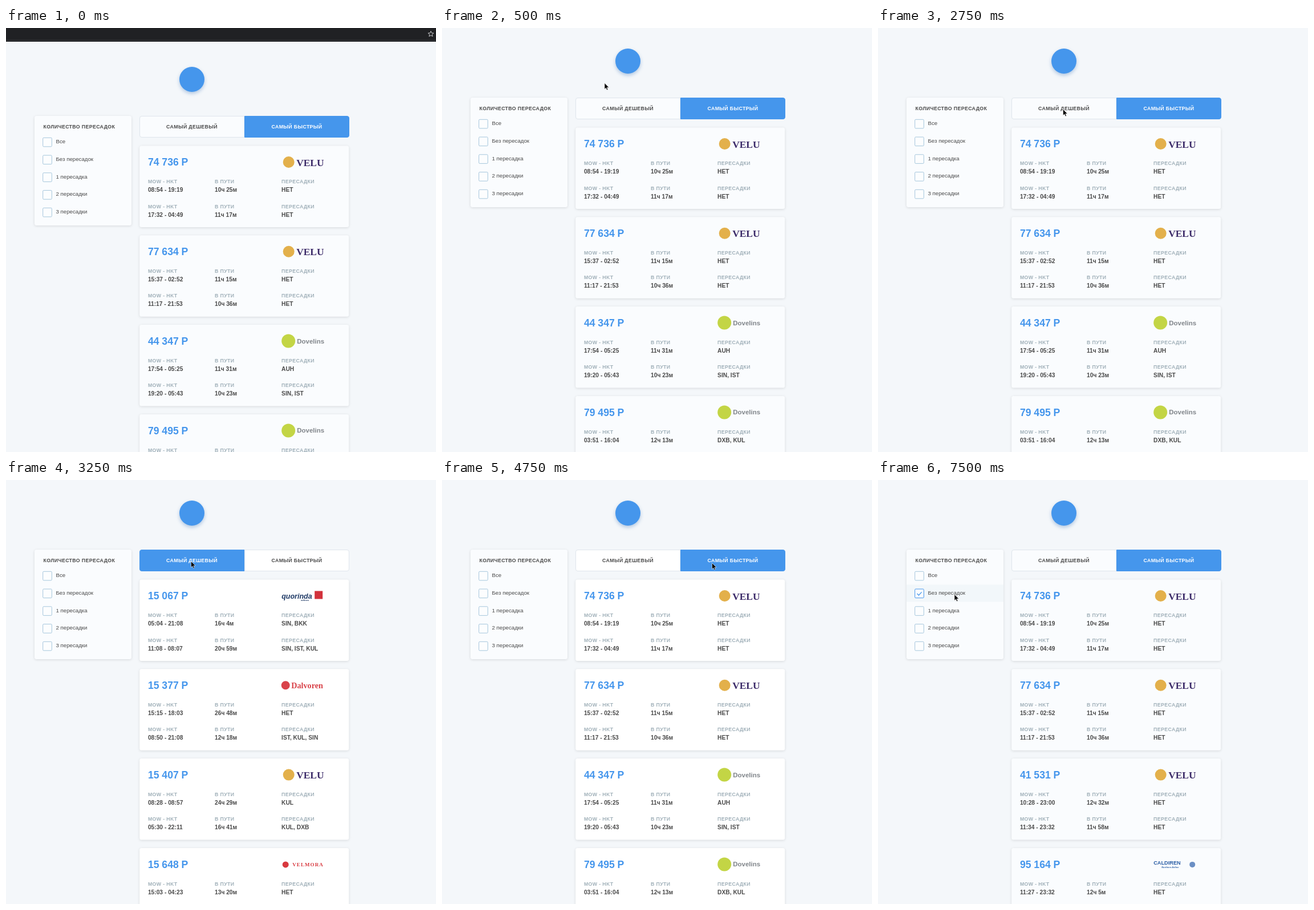
Animation, 754 px wide and 743 px high, one loop 8000 ms. Source, as an HTML page:

```html
<!DOCTYPE html>
<html lang="ru">
<meta charset="utf-8">
<title>Flights</title>
<style>
  html, body { margin: 0; width: 100%; height: 100%; overflow: hidden; background: #f4f7fa; }
  svg { display: block; font: 700 8.77px "Liberation Sans", Arial, sans-serif; fill: #4a4a4a; }
  .box { filter: drop-shadow(0 1px 2px rgba(0, 0, 0, .12)); }
  .caps { letter-spacing: .37px; }
  .label { fill: #a0b0b9; letter-spacing: .37px; }
  .value { font-size: 10.24px; }
  .price { font-size: 17.6px; fill: #4596ec; }
  .option { font-size: 9.7px; font-weight: 400; }
  .serif { font-family: "Liberation Serif", Times, serif; }
</style>
<svg width="754" height="743" viewBox="0 0 754 743">
  <g id="page"></g>
  <g id="bar">
    <rect width="754" height="24" fill="#202124"/>
    <rect y="21" width="754" height="1" fill="#37383b"/>
    <path d="M745 5.5l1.4 3.2 3.5.3-2.7 2.3.9 3.4-3.1-1.8-3.1 1.8.9-3.4-2.7-2.3 3.5-.3z" fill="none" stroke="#c6c7c9"/>
  </g>
  <path id="cursor" d="M.5.5V11.2L3 8.9l1.6 3.8 1.8-.8-1.6-3.7h3.4Z" fill="#000" stroke="#fff" stroke-width=".6"/>
</svg>
<script>
const BLUE = '#4596ec';
const $ = id => document.getElementById(id);

// Flights: price, airline, then departure, duration and stops for each leg
const velu1 = ['74 736', 'velu', ['08:54 - 19:19', '10ч 25м', 'НЕТ'], ['17:32 - 04:49', '11ч 17м', 'НЕТ']];
const velu2 = ['77 634', 'velu', ['15:37 - 02:52', '11ч 15м', 'НЕТ'], ['11:17 - 21:53', '10ч 36м', 'НЕТ']];
const lists = {
  fast: [velu1, velu2,
    ['44 347', 'dovelins', ['17:54 - 05:25', '11ч 31м', 'AUH'], ['19:20 - 05:43', '10ч 23м', 'SIN, IST']],
    ['79 495', 'dovelins', ['03:51 - 16:04', '12ч 13м', 'DXB, KUL']]],
  cheap: [
    ['15 067', 'quorinda', ['05:04 - 21:08', '16ч 4м', 'SIN, BKK'], ['11:08 - 08:07', '20ч 59м', 'SIN, IST, KUL']],
    ['15 377', 'dalvoren', ['15:15 - 18:03', '26ч 48м', 'НЕТ'], ['08:50 - 21:08', '12ч 18м', 'IST, KUL, SIN']],
    ['15 407', 'velu', ['08:28 - 08:57', '24ч 29м', 'KUL'], ['05:30 - 22:11', '16ч 41м', 'KUL, DXB']],
    ['15 648', 'velmora', ['15:03 - 04:23', '13ч 20м', 'НЕТ']]],
  direct: [velu1, velu2,
    ['41 531', 'velu', ['10:28 - 23:00', '12ч 32м', 'НЕТ'], ['11:34 - 23:32', '11ч 58м', 'НЕТ']],
    ['95 164', 'caldiren', ['11:27 - 23:32', '12ч 5м', 'НЕТ']]]
};

const text = (x, y, s, cls, attrs = '') => `<text x="${x}" y="${y}" class="${cls}" ${attrs}>${s}</text>`;
const dot = (x, y, r, fill) => `<circle cx="${x}" cy="${y}" r="${r}" fill="${fill}"/>`;
const styled = (fill, size, more = '') => `style="fill:${fill};font-size:${size}px;${more}"`;

// Airline marks, relative to the card corner
const airlines = {
  velu: dot(261.5, 28.5, 10, '#e3b04b') + text(275, 35, 'VELU', 'serif', styled('#3b2a68', 17.4)),
  dovelins: dot(261, 28.5, 12, '#c3d545') + text(276, 32.5, 'Dovelins', '', styled('#80858a', 11.5)),
  quorinda: text(249, 33, 'quorinda', '', styled('#1f3a66', 12.5, 'font-style:italic')) +
    text(283, 37.5, 'airlines', '', styled('#1f3a66', 4)) +
    '<rect x="307" y="20" width="14" height="14" fill="#d2323c"/>',
  dalvoren: dot(256, 28.5, 7.5, '#d9434a') + text(266, 33.5, 'Dalvoren', 'serif', styled('#d9434a', 14.2)),
  velmora: dot(256, 29, 5.5, '#d8393f') + text(268, 32.5, 'VELMORA', 'serif', styled('#d8393f', 9, 'letter-spacing:1.1px')),
  caldiren: text(249, 29, 'CALDIREN', '', styled('#2a5da5', 9.2)) +
    text(263, 35.5, 'Northern Airline', '', styled('#2a5da5', 4, 'font-style:italic')) + dot(317, 29, 5, '#6b8fc4')
};

function card([price, airline, ...legs], i, fill) {
  const rows = legs.map((leg, row) => leg.map((value, col) => {
    const x = 14.7 + col * 117.1, y = 65.7 + row * 43.3;
    return text(x, y, ['MOW - HKT', 'В ПУТИ', 'ПЕРЕСАДКИ'][col], 'label') + text(x, y + 15, value, 'value');
  }).join('')).join('');
  return `<g transform="translate(234.2 ${174.5 + i * 156.8})">
    <rect class="box" width="367" height="142.4" rx="3.5" fill="${fill}"/>
    ${text(14.7, 34.7, price + ' Р', 'price')}${airlines[airline]}${rows}</g>`;
}

function tab(x, label, active, fill, edge) {
  return `<path d="${edge}" fill="${active ? BLUE : fill}" stroke="${active ? BLUE : '#dfe5ec'}"/>` +
    text(x, 143.6, label, 'caps', `text-anchor="middle"${active ? ' style="fill:#fff"' : ''}`);
}

function option(label, i, checked, hover) {
  const y = 160.3 + i * 30.75;
  return (hover ? `<rect x="50" y="${y - 7.6}" width="170" height="30" fill="#f2f7fa"/>` : '') +
    `<rect x="64.7" y="${y}" width="15.6" height="15.6" rx="1.5" fill="#fcfdfe" stroke="${checked ? BLUE : '#a5c6dc'}"/>` +
    (checked ? `<path d="M68.6 ${y + 8}l2.8 2.9 5.2-5.6" fill="none" stroke="${BLUE}" stroke-width="1.3"/>` : '') +
    text(87.5, y + 9.9, label, 'option');
}

function page(list, hover, fill) {
  const cheap = list === 'cheap', checked = list === 'direct';
  return '<circle cx="326" cy="58" r="22" fill="#4596ec" style="filter:drop-shadow(0 3px 3px rgba(50,110,180,.35))"/>' +
    '<rect class="box" x="50" y="122" width="170" height="192" rx="3.5" fill="#fafcfe"/>' +
    text(65.5, 143.6, 'КОЛИЧЕСТВО ПЕРЕСАДОК', 'caps') +
    ['Все', 'Без пересадок', '1 пересадка', '2 пересадки', '3 пересадки']
      .map((label, i) => option(label, i, checked && i === 1, hover === i)).join('') +
    tab(326, 'САМЫЙ ДЕШЕВЫЙ', cheap, fill, 'M418 122.5H238a3.5 3.5 0 0 0-3.5 3.5V156a3.5 3.5 0 0 0 3.5 3.5H418Z') +
    tab(510, 'САМЫЙ БЫСТРЫЙ', !cheap, fill, 'M418.5 122.5H598a3.5 3.5 0 0 1 3.5 3.5V156a3.5 3.5 0 0 1-3.5 3.5H418.5Z') +
    lists[list].map((flight, i) => card(flight, i, fill)).join('');
}

// Pointer stops: time, x, y
const stops = [
  [0, -50, -50], [250, 510, 99], [500, 284.5, 96], [750, 269, 86], [1000, 312, 135], [1250, 313, 137],
  [2500, 324, 144], [2750, 324, 142], [4000, 461, 128], [4250, 473, 132], [4500, 473, 145],
  [5250, 466, 143], [5500, 286, 188], [5750, 148, 185], [6000, 123, 174], [6750, 132, 214],
  [7000, 132, 203], [7250, 133.5, 200]
];

let shown;
function draw(now) {
  const t = now % 8000;
  const list = t >= 7500 ? 'direct' : t >= 3250 && t < 4750 ? 'cheap' : 'fast';
  const hover = t < 5750 ? -1 : t >= 6000 && t < 6750 ? 0 : 1;
  const fill = t >= 3250 && t < 7500 ? '#fff' : '#fafcfe';
  const key = list + hover + fill;
  if (key !== shown) {
    $('page').innerHTML = page(list, hover, fill);
    shown = key;
  }
  const top = t < 500;
  $('page').setAttribute('transform', `translate(0 ${top ? 32 : 0})`);
  $('bar').setAttribute('visibility', top ? 'visible' : 'hidden');
  const [, x, y] = stops.findLast(stop => stop[0] <= t);
  $('cursor').setAttribute('transform', `translate(${x} ${y})`);
  requestAnimationFrame(() => draw(performance.now()));
}
draw(performance.now());
</script>
</html>
```
